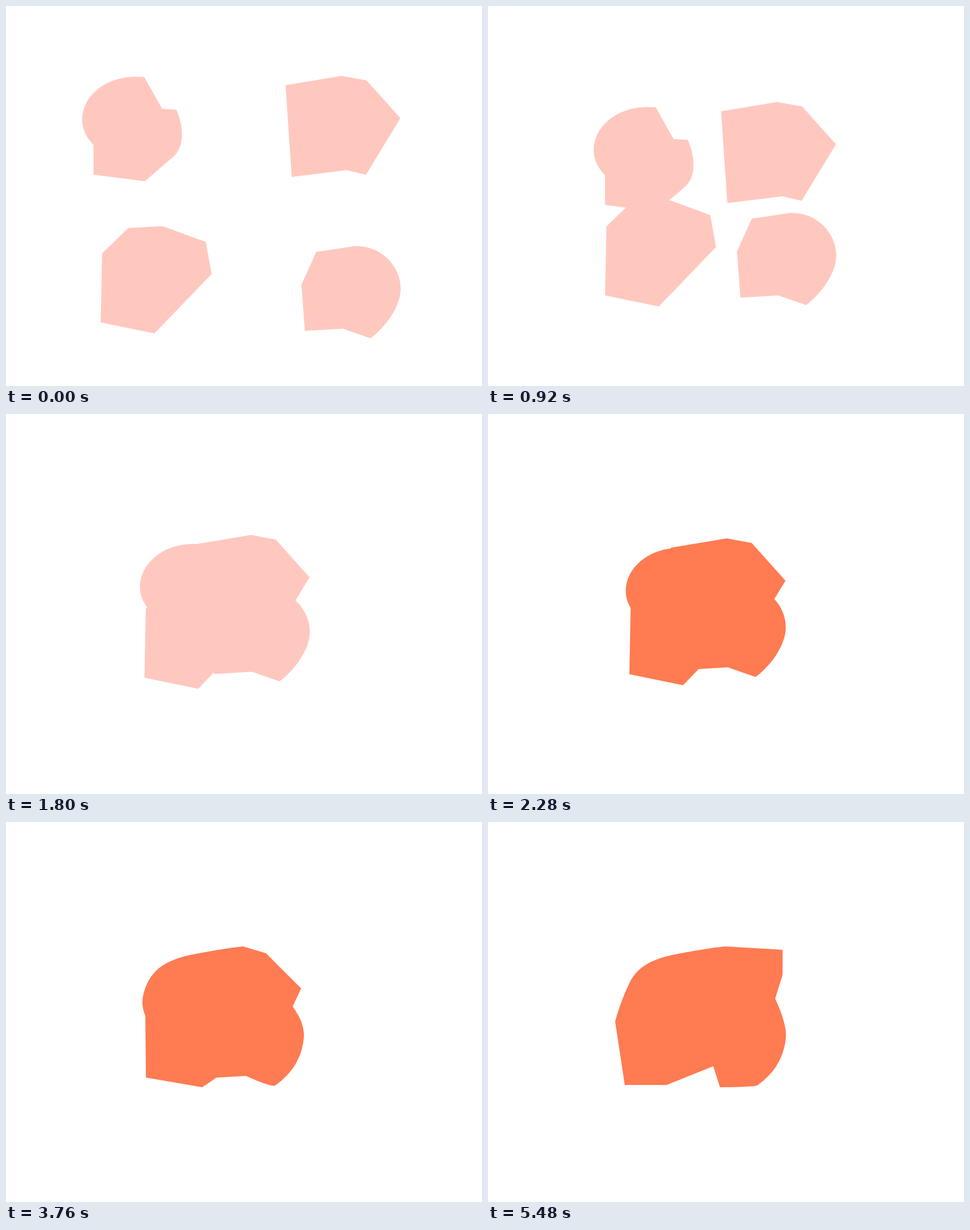
An HTML page that plays this animation: 837x669 px, repeating every 6520 ms.

```html
<!DOCTYPE html>
<html lang="en">
<head>
<meta charset="utf-8">
<title>Merging shapes</title>
<style>
  html, body { margin: 0; width: 100%; height: 100%; overflow: hidden; background: #fff; }
  svg { display: block; width: 837px; height: 669px; }
</style>
</head>
<body>
<svg viewBox="0 0 837 669">
  <g id="art">
    <g id="pieces">
      <path d="M243 125L274.5 181L299.5 182.5C305 195 309.5 211 309.5 226C309.5 242 304.5 256 294.5 265L244 308.5L154 297V245C141 231 134 217 134 200C134 159 175 124.5 228 124.5Q236 124.5 243 125Z"/>
      <path d="M491.5 139.5L590 123L634 131L693.5 197.5L633 297L599 289L502.5 301Z"/>
      <path d="M215 391L275 387.5L351.5 415.5L361.5 472L261 576.5L166.5 557L169 435.5Z"/>
      <path d="M545.5 433L611 423C657 420 694 456 694 498C694 526 672 561 641 585L592 568L525.5 572L519.5 490.5Z"/>
    </g>
    <path id="blob"/>
  </g>
</svg>
<script>
const LOOP = 6520, STEP = 40;
const JOIN = 1920, TINT = 2160, MERGE = 2880, STAGE = 880;
const [art, pieces, blob] = ['art', 'pieces', 'blob'].map(id => document.getElementById(id));

// total travel of each piece
const travel = [[108.3, 111.3], [-170.4, 96], [82, -99], [-170.4, -122]];
const pale = [255, 200, 191], strong = [255, 123, 82];

// free corners of the merged shape, clockwise from the top right
const poses = [
  [457, 231, 519, 293, 504, 325, 422, 447, 370, 450, 345, 467, 246, 450, 245, 341],
  [471, 225, 501.5, 286, 503.5, 325, 422, 480.5, 370, 464, 366, 426, 293, 436, 228, 346],
  [518, 225, 518, 269, 505, 311, 408, 467, 396, 430, 314, 463, 240.5, 463, 223.5, 351]
];

const part = (t, from, length) => Math.min(1, Math.max(0, (t - from) / length));
const easeOut = k => 1 - (1 - k) ** 3;
const mix = (a, b, k) => a.map((v, i) => v + (b[i] - v) * k);
const show = (el, on) => el.setAttribute('visibility', on ? 'visible' : 'hidden');

// the pieces fly together, then sink under the smoothed outline
function placePieces(t) {
  const k = part(t, 0, JOIN);
  const size = 1 - 0.1 * easeOut(part(t, MERGE, STAGE));
  pieces.setAttribute('transform', `translate(383 350) scale(${size}) translate(-383 -350)`);
  travel.forEach(([x, y], i) =>
    pieces.children[i].setAttribute('transform', `translate(${x * k} ${y * k})`));
}

// curved parts stay put while the corners between them move
function outline(t) {
  const move = i => easeOut(part(t, MERGE + i * STAGE, STAGE));
  const c = mix(mix(poses[0], poses[1], move(1)), poses[2], move(2));
  const corners = (from, to) => c.slice(from * 2, to * 2).join(' ');
  return `M417 219L${corners(0, 3)}Q523 350 524 374C523 411 504 443 473 464` +
    `Q465 466.5 ${corners(3, 4)}L${corners(4, 8)}Q233.5 315 248 285` +
    'C259 260 280 246 312 237C340 230 386 222.5 417 219Z';
}

function draw(time) {
  const t = Math.floor((time % LOOP) / STEP) * STEP;
  const color = mix(pale, strong, part(t, TINT, 3 * STEP)).map(Math.round);
  art.setAttribute('fill', `rgb(${color})`);
  placePieces(t);
  blob.setAttribute('d', outline(t));
  show(pieces, t < MERGE + STAGE);
  show(blob, t >= MERGE);
}

const start = performance.now();
function tick() {
  draw(performance.now() - start);
  requestAnimationFrame(tick);
}
tick();
</script>
</body>
</html>
```
